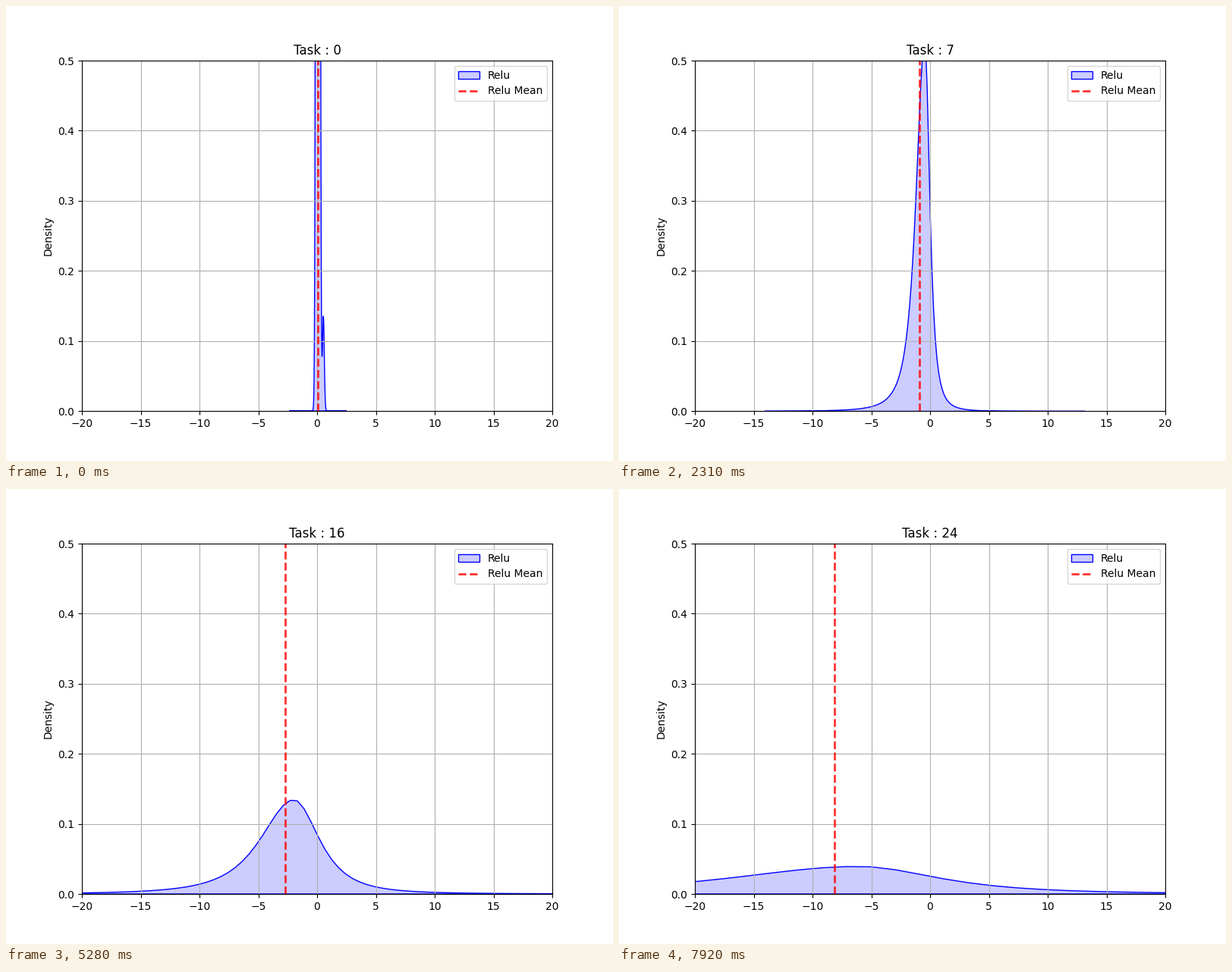
Recreate the animation shown at these times as a matplotlib script. Size 800x600 px, loop 8000 ms.

```python
import numpy as np
import matplotlib.pyplot as plt
from matplotlib.animation import FuncAnimation

LOOP, STEP, HOLD = 8000, 40, 330  # ms
TASKS = 25

# Key tasks: mean, peak position, peak height, left and right half widths
KEYS = {
    0: (.08, .07, 8, .118, .122),
    3: (-.37, -.29, 1.2, .365, .3),
    7: (-.88, -.48, .53, .87, .49),
    12: (-6.95, -4.2, .0675, 6.9, 4.68),
    16: (-2.68, -1.98, .1345, 3.32, 2.53),
    19: (-7.33, -5.3, .0598, 7.9, 5.1),
    24: (-8.1, -6.06, .0393, 12.7, 7.9),
}


def params(task):
    """Blend the key tasks: places linearly, sizes geometrically."""
    keys = list(KEYS)
    cols = np.array(list(KEYS.values()), dtype=float).T
    places = [np.interp(task, keys, c) for c in cols[:2]]
    sizes = [np.exp(np.interp(task, keys, np.log(c))) for c in cols[2:]]
    return (*places, *sizes)


def bell(u, tail):
    """Curve with value 1 at u = 0 and 1/2 at u = 1; small tail is heavy."""
    return (1 + u * u / tail) ** (-np.log(2) / np.log(1 + 1 / tail))


def density(task):
    """Outline of the density and the mean of one task."""
    mean, peak, height, left, right = params(task)
    dx = 10 * (left + right) * np.linspace(-1, 1, 200)
    tail = 1.8 + 98 * .05 ** task  # near Gaussian at first, then heavy
    y = height * bell(dx / np.where(dx < 0, left, right), tail)
    x = peak + dx
    if task == 0:
        y += .135 * np.exp(-((x - .535) / .078) ** 2 / 2)
    top = np.column_stack([x, y])
    return np.vstack([[x[0], 0], top, [x[-1], 0]]), mean


CURVES = [density(task) for task in range(TASKS)]

fig, ax = plt.subplots(figsize=(8, 6), dpi=100)
area = ax.fill_between([0, 1], [0, 0], facecolor=(0, 0, 1, .2),
                       edgecolor="blue", linewidth=1, label="Relu")
line = ax.axvline(0, color="red", linestyle="--", linewidth=2, alpha=.8,
                  label="Relu Mean")
title = ax.set_title("Task : 0")
ax.set_xlim(-20, 20)
ax.set_ylim(0, .5)
ax.set_ylabel("Density")
ax.grid(True)
ax.legend(loc="upper right")


def update(n):
    task = (n * STEP + STEP - 1) // HOLD
    outline, mean = CURVES[task]
    area.set_verts([outline])
    line.set_xdata([mean, mean])
    title.set_text(f"Task : {task}")
    return area, line, title


anim = FuncAnimation(fig, update, frames=LOOP // STEP, interval=STEP,
                     repeat=True, repeat_delay=0, blit=False)
plt.show()
```
